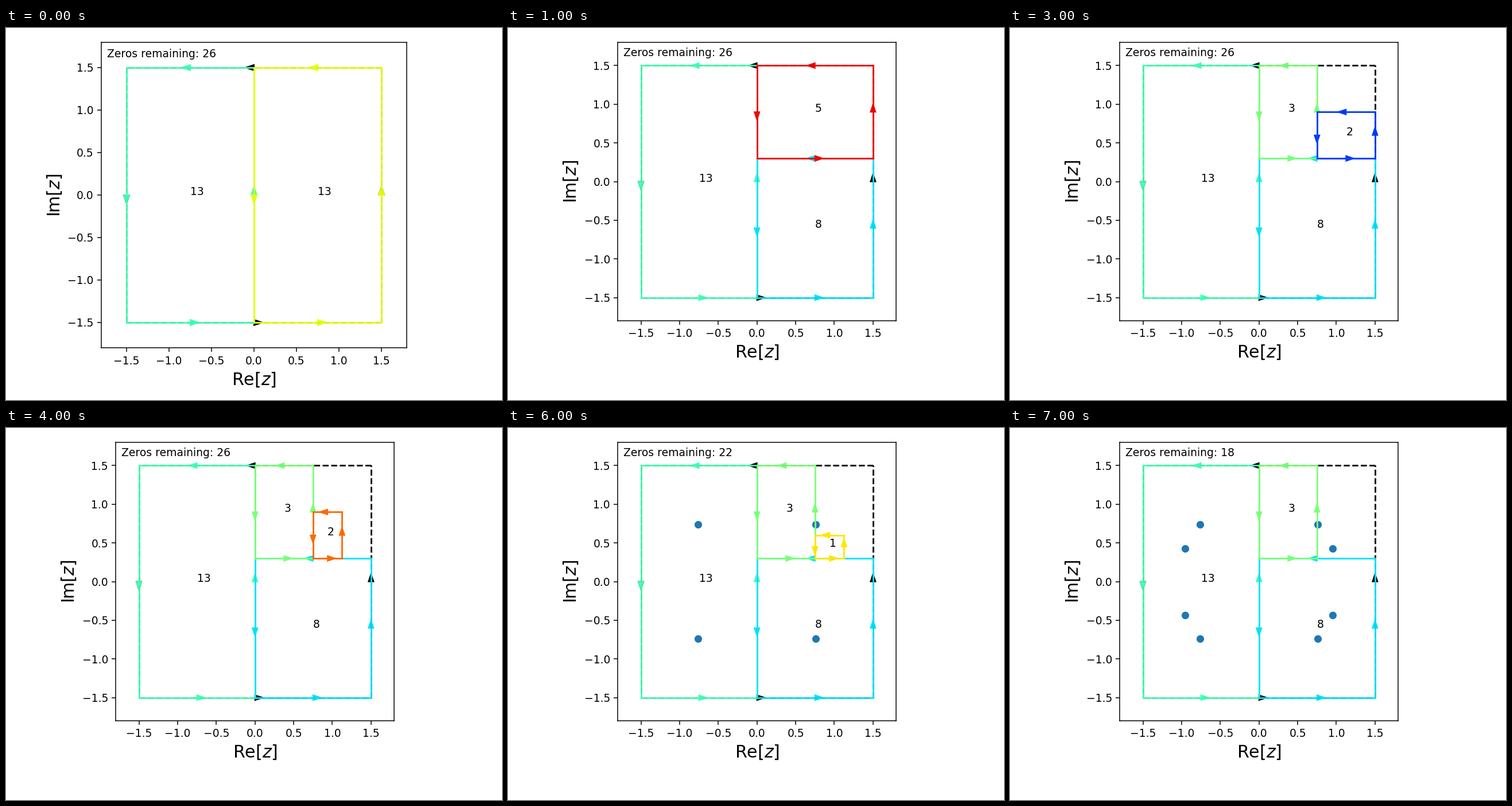
A matplotlib script for the animation above (8000 ms loop, 864 px wide and 648 px high).

```python
import matplotlib.pyplot as plt
import numpy as np
from matplotlib.animation import FuncAnimation

W, H, DPI = 864, 648, 135
LIM = 1.8
HEAD = 2 * LIM * np.sqrt(2) / 75
JET = plt.get_cmap("jet")

# name: (x0, x1, y0, y1, zeros inside, colormap position)
BOXES = {
    "left": (-1.5, 0, -1.5, 1.5, 13, 0.43),
    "right": (0, 1.5, -1.5, 1.5, 13, 0.63),
    "lower": (0, 1.5, -1.5, 0.3, 8, 0.345),
    "upper": (0, 1.5, 0.3, 1.5, 5, 0.906),
    "upper_l": (0, 0.75, 0.3, 1.5, 3, 0.502),
    "upper_r": (0.75, 1.5, 0.3, 1.5, 2, 0.74),
    "half": (0.75, 1.5, 0.3, 0.9, 2, 0.18),
    "quarter": (0.75, 1.125, 0.3, 0.9, 2, 0.8),
    "cell_low": (0.75, 1.125, 0.3, 0.6, 1, 0.667),
    "cell_high": (0.75, 1.125, 0.6, 0.9, 1, 0.598),
}

BASE = ["left", "lower", "upper_l"]
# boxes in drawing order, number of known root quadruples
STEPS = [
    (["left", "right"], 0),
    (["left", "lower", "upper"], 0),
    (BASE + ["upper_r"], 0),
    (BASE + ["half"], 0),
    (BASE + ["quarter"], 0),
    (BASE + ["cell_low", "cell_high"], 0),
    (BASE + ["cell_low"], 1),
    (BASE, 2),
]
ROOTS = [(0.759, 0.74), (0.953, 0.43)]
TOTAL = 26

fig = plt.figure(figsize=(W / DPI, H / DPI), dpi=DPI, facecolor="white")
ax = fig.add_axes([0.2, 0.2, 0.6, 0.6])


def place_axes(left, top, size):
    ax.set_position([left / W, 1 - (top + size) / H, size / W, size / H])


def draw_contour(x0, x1, y0, y1, color, style="-"):
    """Counter-clockwise rectangle with an arrow head from each side's middle."""
    corners = [(x0, y0), (x1, y0), (x1, y1), (x0, y1), (x0, y0)]
    for (xa, ya), (xb, yb) in zip(corners, corners[1:]):
        ax.plot([xa, xb], [ya, yb], color=color, linestyle=style)
        dx, dy = np.sign(xb - xa), np.sign(yb - ya)
        ax.arrow((xa + xb) / 2, (ya + yb) / 2, 1e-6 * dx, 1e-6 * dy,
                 head_width=HEAD, fc=color, ec=color)


def draw(step):
    names, known = STEPS[step]
    ax.clear()
    if step == 0:
        place_axes(165.6, 24.6, 532.8)
    else:
        place_axes(191.1, 25.0, 485.2)

    draw_contour(-1.5, 1.5, -1.5, 1.5, "k", "--")
    for name in names:
        x0, x1, y0, y1, zeros, shade = BOXES[name]
        draw_contour(x0, x1, y0, y1, JET(shade))
        ax.text((x0 + x1) / 2, (y0 + y1) / 2, str(zeros))

    for x, y in ROOTS[:known]:
        ax.scatter([x, -x, -x, x], [y, y, -y, -y], color="C0")

    ax.text(0.02, 0.95, f"Zeros remaining: {TOTAL - 4 * known}",
            transform=ax.transAxes)
    ticks = np.arange(-1.5, 1.6, 0.5)
    ax.set(xlim=(-LIM, LIM), ylim=(-LIM, LIM), xticks=ticks, yticks=ticks)
    ax.set_xlabel("Re[$z$]", size=16)
    ax.set_ylabel("Im[$z$]", size=16)
    return []


anim = FuncAnimation(fig, draw, frames=len(STEPS), init_func=lambda: draw(0),
                     interval=1000, repeat=True, repeat_delay=0)
plt.show()
```
